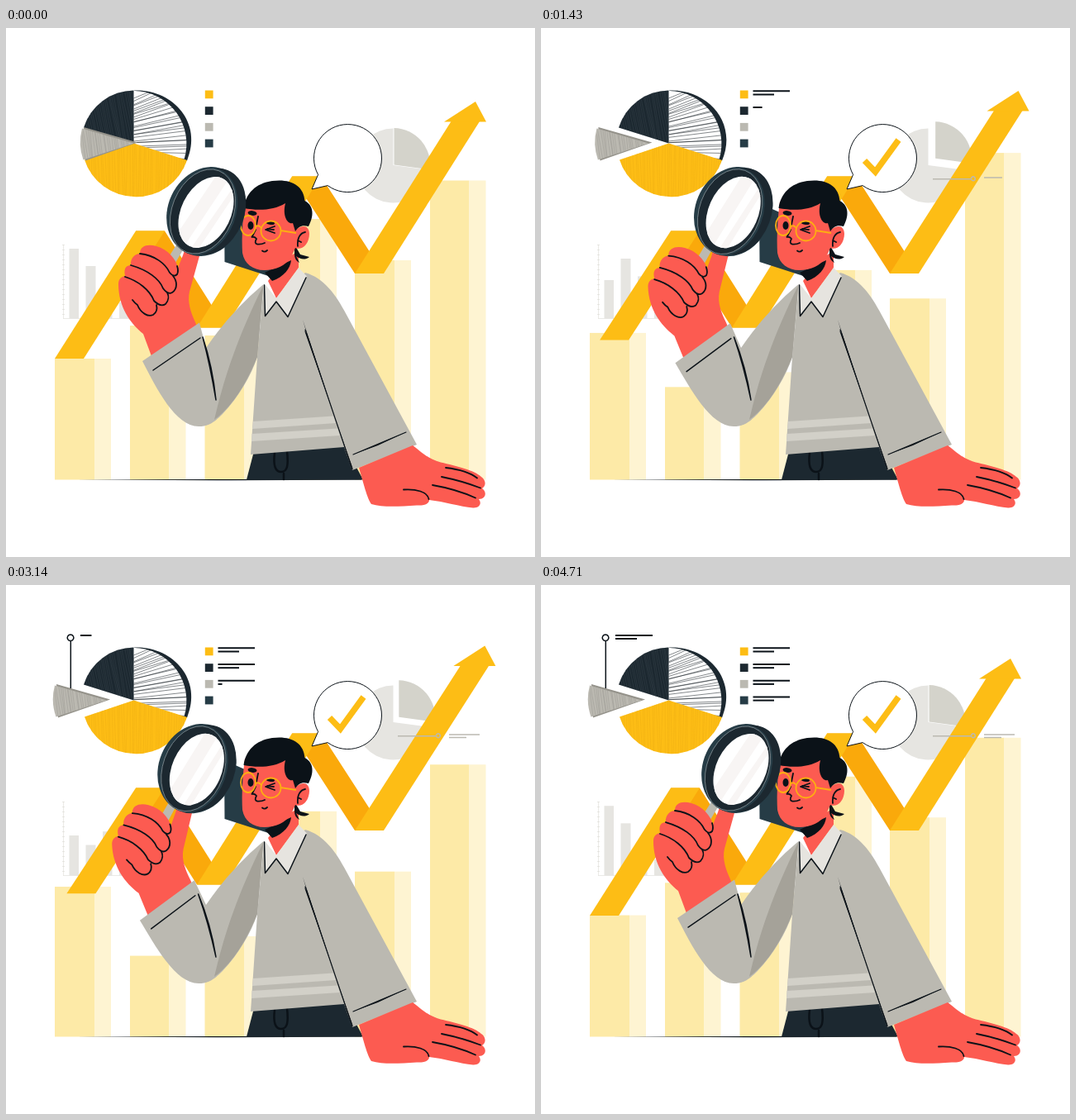
Animation of 640 by 640 pixels, one loop 4780 ms. Source, as an HTML page:

```html
<!DOCTYPE html>
<html lang="en">
<head>
<meta charset="utf-8">
<title>Data analysis</title>
<style>
html, body { margin: 0; height: 100%; overflow: hidden; background: #fff; }
svg { display: block; width: 100vw; height: 100vh; }
.skin { fill: #fc5b51; }
.knit { fill: #bbb9b1; }
.dark { fill: #1c2830; }
.ink { fill: #0b1218; }
.steel { fill: #263c46; }
.gold { fill: #fdbd15; }
.amber { fill: #faa90b; }
.line { fill: none; stroke: #0b1218; stroke-width: 1.8; stroke-linecap: round; stroke-linejoin: round; }
.grow { fill: none; stroke: #0b1218; stroke-width: 2; }
.thin { stroke: #bbb9b1; stroke-width: 1.5; }
.rim { fill: none; stroke: #fdae12; stroke-width: 1.8; }
</style>
</head>
<body>
<svg viewBox="0 0 640 640" xmlns="http://www.w3.org/2000/svg">
  <defs>
    <clipPath id="clipWhite"><path d="M154.500 139.500V75.500A64 64 0 0 1 215.500 159Z"/></clipPath>
    <clipPath id="clipDark"><path d="M154.500 139.500V75.500A64 64 0 0 0 94 120.500Z"/></clipPath>
    <clipPath id="clipGold"><path d="M154.500 139.500L95 159.500A65.200 64.500 0 0 0 219 160Z"/></clipPath>
    <clipPath id="clipGrey"><path d="M154.500 139.500L94 120.500A64 64 0 0 0 95 159.500Z"/></clipPath>
    <clipPath id="clipGlass"><ellipse cx="242" cy="223" rx="30" ry="45.500" transform="rotate(26 242 223)"/></clipPath>
  </defs>

  <g id="bars"></g>
  <path d="M69.500 262V352" stroke="#d4d3cb" stroke-dasharray="1 5" stroke-width="2"/>
  <path d="M69.500 262V352M69 351.500H160" stroke="#e6e5e1" stroke-width=".8"/>
  <path class="ink" d="M86 546.400L270 546L430 546.300V546.800L270 547.200Z"/>

  <!-- grey pie -->
  <path fill="#e6e5e1" d="M468.500 166V121.500A45 45 0 1 0 513 172Z"/>
  <path id="slice" fill="#d4d3cb" d="M469.500 165.500V121A45 45 0 0 1 513 171.500Z"/>

  <!-- trend line -->
  <path class="amber" d="M157 245.500H192L266 362.500H231ZM346 179.500H381L457 297H422Z"/>
  <path id="rise" class="gold"/>
  <path class="gold" d="M231 362.500H265L381 179.500H346Z"/>
  <path id="shaft" class="gold"/>
  <path id="arrow" class="gold" d="M568 89L581 113.500H530Z"/>
  <path class="grow thin" data-span="0 200" d="M520.500 182.500A2.400 2.400 0 1 1 520.600 183"/>
  <path class="grow thin" data-span="200 1010" d="M520.500 182.700H474"/>
  <path class="grow thin" data-span="740 1900" d="M536 181H573"/>
  <path class="grow thin" data-span="1940 2560" d="M536 184.500H557"/>

  <!-- speech bubble -->
  <path fill="#fff" stroke="#0b1218" stroke-width="1" d="M377.600 177.400A41 41 0 1 1 389.200 190.600L370 195Z"/>
  <path class="grow" style="stroke:#fdbd15;stroke-width:7.300" data-span="300 1130" d="M391.500 160.500L404.500 174L432.500 135.500"/>

  <!-- sketched pie -->
  <path class="dark" d="M154.500 75.500C200 73 239 113 219 160.500L212 158L190 90Z"/>
  <path fill="#fff" d="M154.500 139.500V76A64 64 0 0 1 215.500 159Z"/>
  <path class="dark" d="M154.500 139.500V75.500A64 64 0 0 0 94 120.500Z"/>
  <path class="gold" d="M154.500 139.500L95 159.500A65.200 64.500 0 0 0 219 160Z"/>
  <path id="hatchWhite" clip-path="url(#clipWhite)" stroke="#0b1218" stroke-width=".5"/>
  <path id="hatchDark" clip-path="url(#clipDark)" stroke="#36434b" stroke-width=".5"/>
  <path id="hatchGold" clip-path="url(#clipGold)" stroke="#efae12" stroke-width=".5"/>
  <g id="wedge">
    <path fill="#94928a" d="M94 120L159 138.500L96 160.500Z"/>
    <path class="knit" d="M154.500 139.500L92 121.500A64 64 0 0 0 93.500 159.500Z"/>
    <path id="hatchGrey" clip-path="url(#clipGrey)" stroke="#9b9992" stroke-width=".5"/>
  </g>
  <path class="grow" style="stroke-width:1.500" data-span="1850 2370" d="M78.300 125V68"/>
  <path class="grow" style="stroke-width:1.500" data-span="2370 2700" d="M78 67.500A3.800 3.800 0 1 1 78.100 67.500"/>
  <path class="grow" data-span="2900 3700" d="M90 61H135"/>
  <path class="grow" data-span="3700 4150" d="M90 65H116"/>
  <g id="legend"></g>

  <!-- body -->
  <path class="dark" d="M300 512L410 505L432 546.500H291Z"/>
  <path class="line" style="stroke-width:2.500" d="M325 514C323 530 326 537 333 537C340 537 342 530 340 512M336 539V546"/>
  <path class="knit" d="M312 310L327 331L362 296C384 302 399 322 412 347L497 504L419 535L409 507L296 516L304 398Z"/>
  <path fill="#d2d0c8" d="M299 476L396 469.500L399 478L298 485ZM297.500 491L401 484.500L404 493L297 500Z"/>
  <path class="ink" d="M359 353L364 370L361 366L420 534L417 529ZM420 516L484 489L450 505Z"/>
  <path class="line" style="stroke-width:1.200" d="M420 516L484 489M362 365L419 534"/>
  <path class="skin" d="M427 532L492 505C502 512 509 521 526 525.500C545 530 567 535 575 543C581 547 581 554 576 557C582 561 581 570 572 570C576 575 573 581 565 580.500C549 579 530 573 512 571C512 576 505 578 497 577.500C475 579 455 580 442 576C437 570 432 549 427 532Z"/>
  <path class="line" d="M532 532Q558 535 570 544.500M527 543Q552 548 574 556.500M516 553Q545 558 568 568.500M481 558.500C496 557.500 510 561 511.500 570"/>

  <!-- head -->
  <path class="steel" d="M264 212L291 224V280L328 294L322 301.500L264.500 283Z"/>
  <path class="skin" d="M317 306L340 278L354 270V290L327 327Z"/>
  <path class="ink" d="M313 296L345 281C344 291 336 301 322 306Z"/>
  <path class="ink" d="M349 262L356 274L367 277C362 281 356 280 351 276L355 284Q349 281 349 274Z"/>
  <path class="skin" d="M289 210C286 232 285 255 286 272C289 288 303 296 322 292C336 289 344 282 350 266C360 270 367 259 367 249C367 240 360 237 352 243L346 205Z"/>
  <path class="ink" d="M287.500 218C290 200 302 188 322 185C344 182 360 190 361.500 209C371 214 374 225 366 240C358 238 354 240 350 246L347 236C341 238 334 228 338 212C324 221 304 221 287.500 218Z"/>
  <ellipse class="ink" cx="298" cy="224" rx="5.500" ry="2.800" transform="rotate(8 298 224)"/>
  <ellipse class="ink" cx="320" cy="236" rx="5" ry="2" transform="rotate(5 320 236)"/>
  <ellipse class="ink" cx="296" cy="239" rx="3.500" ry="5"/>
  <path class="line" d="M325 240L314 244L325 248M316 243L324 244M305 228L303 238M302 244L297.500 253Q301 252 303 255Q300 261 304 261.500Q309 262 313 260M310 269.500Q313 272 316 269M353 264C352 254 356 248 362 247M353 257L357 259"/>
  <ellipse class="rim" cx="293" cy="239" rx="9" ry="12"/>
  <circle class="rim" cx="320.500" cy="245.500" r="12"/>
  <path class="rim" d="M302 241Q305 237 309 242M332 245L351 248"/>
  <path fill="#e6e4df" d="M312.500 309L327 327L354 290L364 300.500L341 349.500L327 331L313.500 348.500Z"/>
  <path class="line" style="stroke-width:1.500" d="M312.500 311L313.500 348.500L327 331L341 349.500L363 302"/>

  <!-- raised arm -->
  <g id="hand">
    <path class="knit" d="M207 261L215 267L202 289L193 283Z"/>
    <path class="skin" d="M176 397L166 370C150 357 136 337 136 310C136 304 139 301 144 300C142 290 146 287 151 287C150 279 156 273 162 273C162 263 172 261 182 264C196 268 206 280 208 290L214 275Q217 263 226 262Q235 265 234 276L222 319C219 332 224 345 229 356L236 374Z"/>
    <path class="line" d="M162 273C180 275 193 285 198 296Q203 302 207 298Q209 294 207 288M151 287C172 293 186 304 190 315Q196 323 201 320C208 315 207 306 202 300M144 301C160 306 174 317 179 330Q187 338 193 334C198 328 197 324 195 320M153 329Q156 333 159 335C163 345 172 350 178 347Q184 343 182 335"/>
    <ellipse class="steel" cx="242" cy="222" rx="46" ry="55.500" transform="rotate(25 242 222)"/>
    <ellipse class="dark" cx="248" cy="222" rx="40" ry="54" transform="rotate(22 248 222)"/>
    <ellipse class="steel" cx="239" cy="222" rx="39" ry="54" transform="rotate(21 239 222)"/>
    <ellipse class="dark" cx="238" cy="222" rx="37" ry="53" transform="rotate(22 238 222)" stroke="#8b979c" stroke-width=".7"/>
    <ellipse fill="#fff" cx="242" cy="223" rx="30" ry="45.500" transform="rotate(26 242 223)"/>
    <path fill="#f8f5f4" clip-path="url(#clipGlass)" d="M205 252L256 176L270 182L217 262ZM224 266L276 191L279 198L231 270Z"/>
  </g>
  <path id="sleeve" class="knit"/>
  <path fill="#a5a299" d="M311.500 311L304 398C292 427 276 456 252 474C262 430 278 378 311.500 311Z"/>
  <path id="folds" class="line" style="stroke-width:1.500"/>
</svg>

<script>
const LOOP = 4780, FRAMES = 67, HALF = LOOP / 2, QUARTER = LOOP / 4;
const $ = id => document.getElementById(id);
const set = (el, attr, value) => el.setAttribute(attr, value);
const clamp = x => Math.min(1, Math.max(0, x));
const smooth = x => x * x * (3 - 2 * x);

// Eased interpolation through [time, value, time, value, ...]
function track(keys, t) {
  let i = 0;
  while (i < keys.length - 4 && t >= keys[i + 2]) i += 2;
  const [t0, v0, t1, v1] = keys.slice(i, i + 4);
  return v0 + (v1 - v0) * smooth(clamp((t - t0) / (t1 - t0)));
}

const swing = (from, to, peak = HALF) => [0, from, peak, to, LOOP, from];

// x, front width, side width, baseline, keys of the top edge
const bars = [
  [59, 48, 20, 546.5, [0, 400, 1200, 367, HALF, 387, 3585, 355, LOOP, 400]],
  [150, 47.5, 20, 546.5, swing(360, 475.5)],
  [240.5, 47.5, 20, 546.5, swing(372, 441)],
  [332, 48, 20, 546.5, [0, 231, 1600, 295, 2900, 268, 3700, 295, LOOP, 231]],
  [422, 48, 20, 546.5, swing(281, 360, 2560)],
  [513, 47.5, 20, 546.5, [0, 184.5, 1200, 149, 3400, 220, LOOP, 184.5]],
  [76.5, 11.5, 0, 351.5, [0, 267, 1400, 305, 2200, 292, 3150, 303, LOOP, 267]],
  [96.5, 12, 0, 351.5, [0, 288, 1000, 276, 3600, 318, LOOP, 288]],
  [117, 11.5, 0, 351.5, swing(312, 294)],
  [137, 11.5, 0, 351.5, swing(332, 320)],
].map(([x, front, side, base, keys]) => {
  const add = (fill, left, width) => {
    const rect = $('bars').appendChild(document.createElementNS('http://www.w3.org/2000/svg', 'rect'));
    Object.entries({ fill, x: left, width }).forEach(([k, v]) => set(rect, k, v));
    return rect;
  };
  const rects = side ? [add('#fdeaa7', x, front), add('#fef4d2', x + front, side)] : [add('#e6e5e1', x, front)];
  return { rects, base, keys };
});

$('legend').innerHTML = ['#fdbd15', '#1c2830', '#bbb9b1', '#263c46'].map((fill, i) => {
  const y = 75.5 + 19.7 * i, start = 100 + 1180 * i;
  return `<rect x="240.800" y="${y}" width="9.800" height="9.800" fill="${fill}"/>
    <path class="grow" data-span="${start} ${start + 590}" d="M256.500 ${y + .8}H301"/>
    <path class="grow" data-span="${start + 600} ${start + 1000}" d="M256.500 ${y + 5}H282"/>`;
}).join('');

// Hand-drawn shading
let seed = 7;
const jitter = n => ((seed = seed * 16807 % 2147483647) / 2147483647 - .5) * n;
function hatch(id, count, line) {
  set($(id), 'd', Array.from({ length: count }, (_, i) => line(i)).join(''));
}
hatch('hatchWhite', 27, i => `M152 ${88 + i * 2.5 + jitter(4)}L222 ${55 + i * 3.9 + jitter(6)}`);
hatch('hatchDark', 26, i => `M${88 + i * 2.6 + jitter(2)} 74L${104 + i * 2.4 + jitter(4)} 142`);
hatch('hatchGold', 44, i => `M${94 + i * 2.9 + jitter(3)} 138L${96 + i * 2.8 + jitter(3)} 205`);
hatch('hatchGrey', 24, i => `M${88 + i * 2.5 + jitter(2)} 118L${94 + i * 2.5 + jitter(3)} 162`);

const growing = [...document.querySelectorAll('.grow')].map(el => {
  set(el, 'pathLength', 1);
  return [el, ...el.dataset.span.split(' ').map(Number)];
});

function draw(t) {
  const s = track(swing(0, 1), t);
  for (const { rects, base, keys } of bars) {
    const top = track(keys, t);
    for (const rect of rects) {
      set(rect, 'y', top);
      set(rect, 'height', base - top);
    }
  }
  for (const [el, from, to] of growing) {
    const p = clamp((t - from) / (to - from));
    el.style.visibility = p ? 'visible' : 'hidden';
    set(el, 'stroke-dasharray', p < 1 ? `${p} 2` : 'none');
  }
  const out = track([0, 0, QUARTER, 8.5, HALF, 0, 3 * QUARTER, 8.5, LOOP, 0], t);
  set($('slice'), 'transform', `translate(${out} ${-out})`);
  set($('wedge'), 'transform', `translate(${track([0, 0, 2130, -33], t)} 0)`);

  const dx = 14.8 * s, dy = -20.3 * s;
  set($('rise'), 'd', `M${59 + 18.8 * s} ${400 - 34.8 * s}h35L192 245.500H157Z`);
  set($('shaft'), 'd', `M422 297H457L${573 + dx} ${113 + dy}H${538.5 + dx}Z`);
  set($('arrow'), 'transform', `translate(${dx} ${dy})`);

  set($('hand'), 'transform', `rotate(${-2.85 * s} 238 515)`);
  set($('sleeve'), 'd', `M311.500 310Q272 343 242 387L${234 - 8 * s} ${356.5 + s}L${165 - 4 * s} ${403 + 3.5 * s}
    C${182 - 2 * s} 436 205 482 233 482C245 482 252 477 262 467C281 447 297 420 304 398Z`);
  set($('folds'), 'd', `M${178 - 3 * s} ${414 + 2.5 * s}L${235 - 8 * s} ${375 + s}
    M${238 - 7 * s} 374Q${250 - 3 * s} 410 254 450Q${247 - 3 * s} 408 ${238 - 7 * s} 374`);
}

function tick(now) {
  const frame = Math.floor(now % LOOP / LOOP * FRAMES);
  draw(frame * LOOP / FRAMES);
  requestAnimationFrame(tick);
}
draw(0);
requestAnimationFrame(tick);
</script>
</body>
</html>
```
